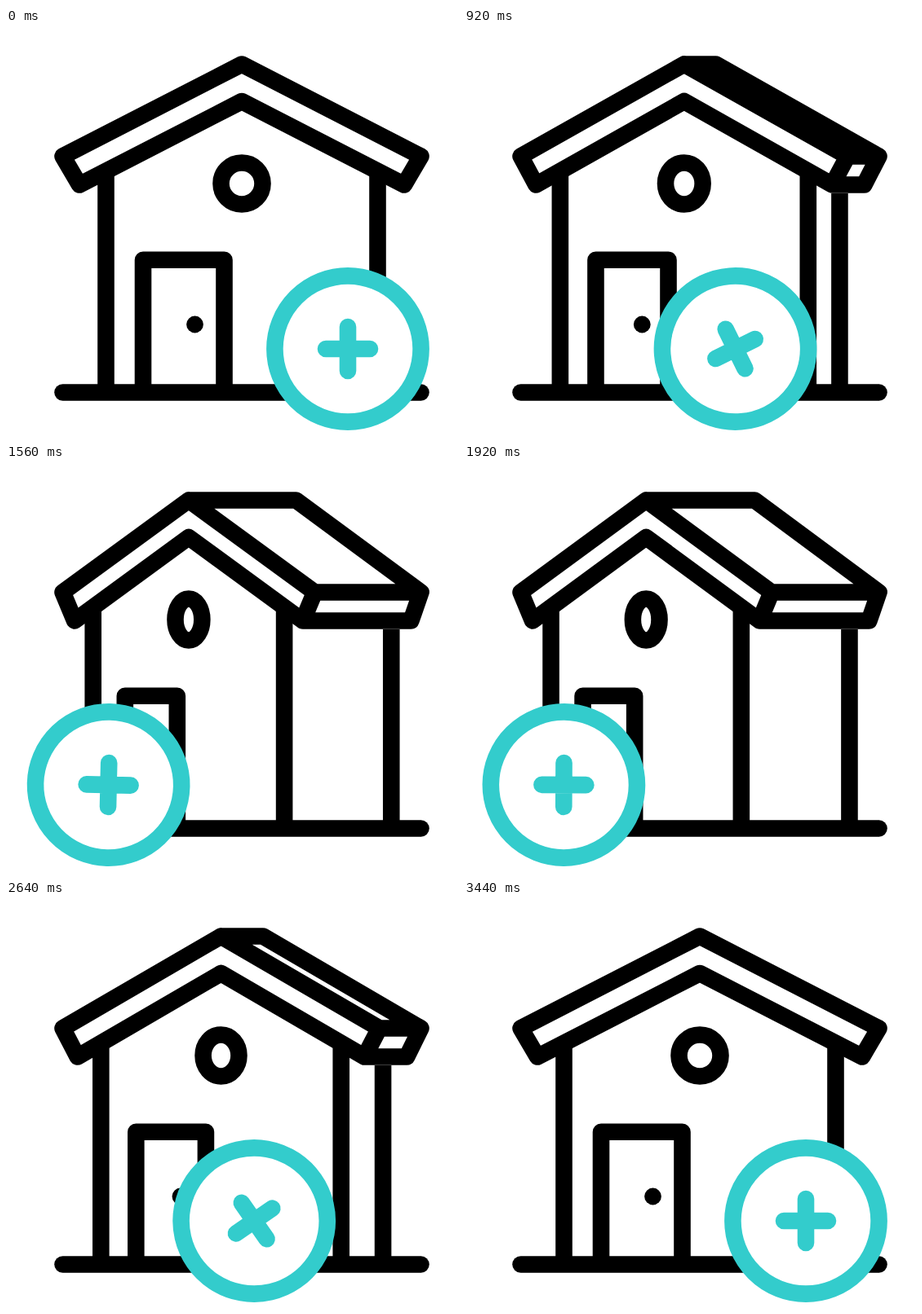
Recreate the animation shown at these times as an HTML page. Size 554x501 px, loop 3600 ms.

```html
<!DOCTYPE html>
<html lang="en">
<head>
<meta charset="utf-8">
<title>Turning house</title>
<style>
html, body { margin: 0; width: 100%; height: 100%; overflow: hidden; background: #fff; }
svg { display: block; }
</style>
</head>
<body>
<svg width="554" height="501" viewBox="0 0 554 501" fill="none" stroke="#000" stroke-width="20.6" stroke-linejoin="round">
  <path d="M69.5 447.5H508.5" stroke-linecap="round"/>
  <path id="walls"/>
  <path id="door"/>
  <path id="roof"/>
  <ellipse id="pane" cy="191" ry="25.5"/>
  <circle id="knob" cy="364" r="10.4" fill="#000" stroke="none"/>
  <g id="badge" stroke="#3cc">
    <circle r="89.6" fill="#fff"/>
    <path d="M-27 0H27M0 -27V27" stroke-linecap="round"/>
  </g>
</svg>
<script>
const LOOP = 3600, TURN = 1600, OUT = 200, BACK = 1804, EASE = 0.81;
const part = id => document.getElementById(id);
const [walls, door, roof, pane, knob, badge] =
  ['walls', 'door', 'roof', 'pane', 'knob', 'badge'].map(part);

// Symmetric cubic Bezier (EASE, 0, 1 - EASE, 1), solved by bisection
function ease(x) {
  if (x <= 0) return 0;
  if (x >= 1) return 1;
  let lo = 0, hi = 1, s;
  for (let i = 0; i < 30; i++) {
    s = (lo + hi) / 2;
    const bx = 3 * EASE * s * (1 - s) ** 2 + 3 * (1 - EASE) * s * s * (1 - s) + s ** 3;
    if (bx < x) lo = s; else hi = s;
  }
  return s * s * (3 - 2 * s);
}

function draw(t) {
  const p = ease((t - OUT) / TURN) - ease((t - BACK) / TURN);
  const mix = (a, b) => a + (b - a) * p;

  const left = 69.5, right = 508.5;
  const peak = mix(289, 223), ridge = mix(289, 356.5);
  const eave = mix(90, 84);
  const frontTop = 2 * peak - left, frontEave = 2 * peak - eave;
  const backEave = 578 - eave + mix(0, 2.5);

  roof.setAttribute('d',
    `M${peak} 44.5L${frontTop} 157.5L${frontEave} 192.5L${peak} 90L${eave} 192.5L${left} 157.5Z` +
    `M${peak} 44.5H${ridge}L${right} 157.5L${backEave} 192.5H${frontEave}L${frontTop} 157.5H${right}`);
  walls.setAttribute('d',
    `M${mix(122.5, 106.5)} 175.5V447M${mix(455.5, 339.5)} 175.5V447M${mix(455.5, 472.5)} 203V447`);
  door.setAttribute('d', `M${mix(168, 145.5)} 447V284.7H${mix(267.5, 209)}V447`);
  pane.setAttribute('cx', peak);
  pane.setAttribute('rx', mix(25.5, 16.3));
  knob.setAttribute('cx', mix(231.5, 186));
  badge.setAttribute('transform', `translate(${mix(419, 121.5)} 394) rotate(${-90 * p})`);
}

const start = performance.now();
function tick() {
  draw((performance.now() - start) % LOOP);
  requestAnimationFrame(tick);
}
tick();
</script>
</body>
</html>
```
